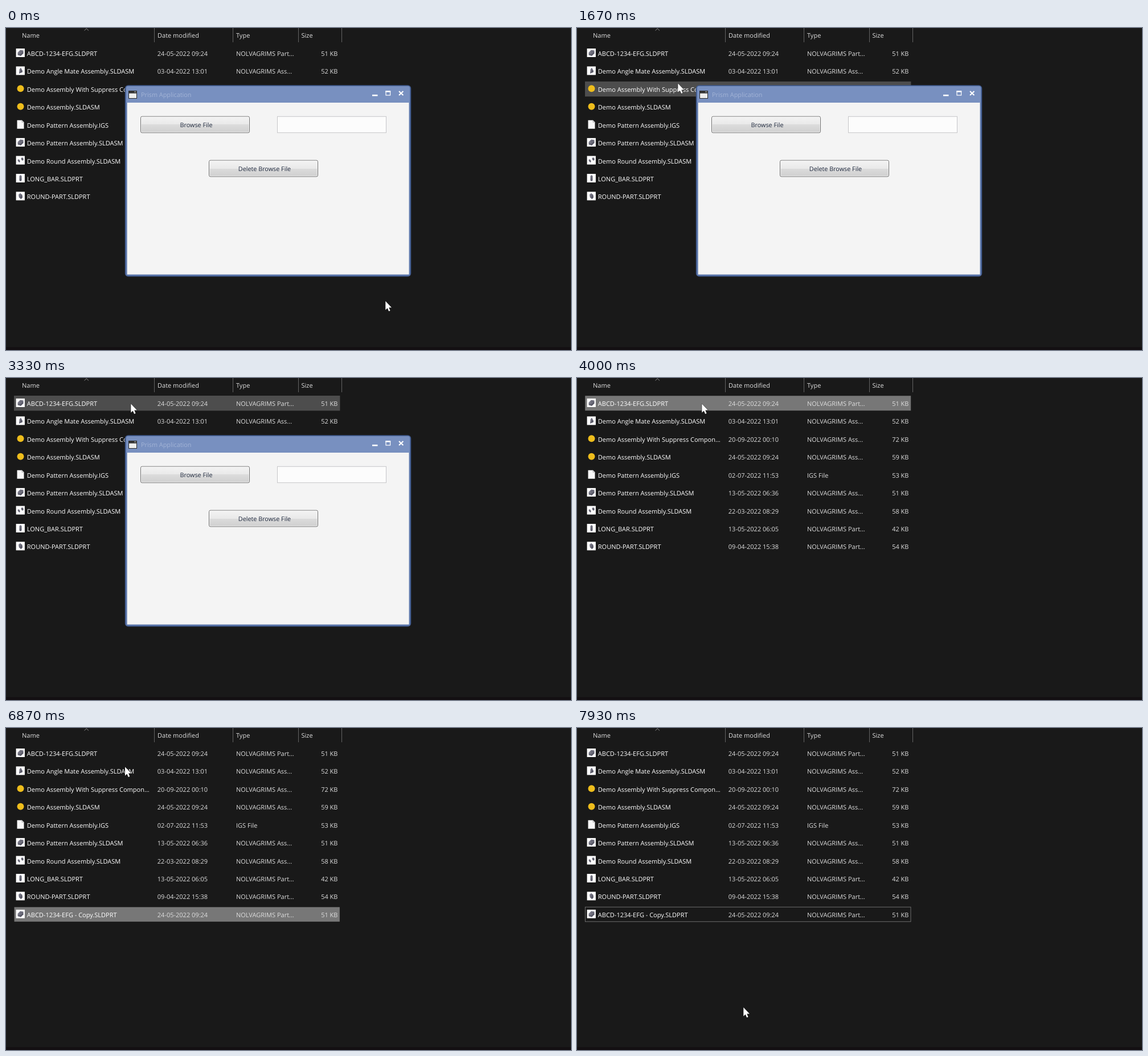
An HTML page that plays this animation: 992 px wide and 565 px high, repeating every 8000 ms.

```html
<!DOCTYPE html>
<html lang="en">
<head>
<meta charset="utf-8">
<title>File list</title>
<style>
  html, body { margin: 0; width: 100%; height: 100%; overflow: hidden; background: #191919; }
  svg { display: block; width: 100%; height: 100%; }
  text { font-family: "Open Sans", "Noto Sans", sans-serif; font-size: 11px; fill: #dedede; text-rendering: geometricPrecision; }
  .name { fill: #fff; }
  .end { text-anchor: end; }
  .ui { font-size: 10.8px; fill: #222c40; text-anchor: middle; }
  .title { font-size: 10.86px; fill: #a3b4d6; }
</style>
</head>
<body>
<svg id="stage" viewBox="0 0 992 565">
  <defs>
    <linearGradient id="face" x2="0" y2="1">
      <stop offset="0" stop-color="#f3f3f3"/>
      <stop offset=".5" stop-color="#e9e9e9"/>
      <stop offset=".5" stop-color="#dcdcdc"/>
      <stop offset="1" stop-color="#cfcfcf"/>
    </linearGradient>
    <linearGradient id="metal" x2="1" y2="1">
      <stop offset="0" stop-color="#8d8d9b"/>
      <stop offset="1" stop-color="#3f3f4d"/>
    </linearGradient>
  </defs>
  <rect width="992" height="565" fill="#191919"/>
  <rect y="560" width="992" height="5" fill="#130f12"/>
  <g id="header">
    <path d="M260.5 0V25M398.5 0V25M513.5 0V25M589.5 0V25" stroke="#636363"/>
    <path d="M137.5 4.5L141.3 1L145 4.5" fill="none" stroke="#8a8a8a"/>
  </g>
  <rect id="hover" x="14" y="31" width="572.4" height="26.4" fill="#4d4d4d"/>
  <rect id="select" x="14.5" y="31.5" width="571.4" height="25.5" fill="#777"/>
  <rect id="focus" x="14.4" y="31.4" width="571.6" height="25.6" fill="none" stroke="#777" stroke-width=".9"/>
  <g id="rows"></g>
  <g id="dialog">
    <rect x="209.5" y="101" width="501" height="334.5" rx="5" fill="#4f6ca3" stroke="#40598c" stroke-width="1.4"/>
    <path d="M211 131V105Q211 102 214 102H706Q709 102 709 105V131Z" fill="#7890c0"/>
    <path d="M211.3 131V433.7H708.7V131" fill="none" stroke="#7088b8" stroke-width=".8"/>
    <rect x="212.6" y="131" width="495" height="301.5" fill="#f4f4f4"/>
    <rect x="215.5" y="110.5" width="14" height="13" fill="#eee" stroke="#2b2b2b"/>
    <path d="M216 112.7H229" stroke="#333" stroke-width="4"/>
    <path d="M225 112H228.5" stroke="#ccc" stroke-width="1"/>
    <text x="237" y="121" class="title">Prism Application</text>
    <g fill="none" stroke="#fff">
      <path d="M643 118.2H652.5" stroke-width="2.6"/>
      <rect x="667" y="111" width="7.6" height="7" stroke-width="1.2"/>
      <path d="M666.4 111.4H675.2" stroke-width="2.4"/>
      <path d="M690 111L697.4 118M697.4 111L690 118" stroke-width="2.1"/>
    </g>
    <rect x="476.5" y="155.3" width="191" height="28.4" fill="#fcfcfc" stroke="#c6c6c9"/>
  </g>
  <path id="cursor" d="M.3 .3V15.8L3.7 12.6L6.1 18L8.6 16.9L6.3 11.6H11Z" fill="#fff" stroke="#111" stroke-width="1" paint-order="stroke"/>
</svg>
<script>
const $ = id => document.getElementById(id);
const add = (id, markup) => $(id).insertAdjacentHTML('beforeend', markup);
const label = (x, y, str, cls = '') => `<text x="${x}" y="${y}" class="${cls}">${str}</text>`;
const pitch = 31.42;
const shift = row => `translate(0 ${row * pitch})`;

const thumb = d =>
  `<rect x="17.6" y="36" width="15.3" height="15" fill="#fff"/><path d="${d}" fill="url(#metal)"/>`;
const icons = {
  block: thumb('M20.5 43L25 38.5L30.5 39.5V44.5L26 49L20.5 47.5Z') +
    '<path d="M20.8 43.2L26 44.3L30.3 39.7" fill="none" stroke="#9c9caa" stroke-width=".5"/>',
  wedge: thumb('M23 48.5L23.6 41L26 38L28.8 43.5V46Z'),
  assembly: '<circle cx="25.5" cy="43.5" r="6" fill="#eebd1c"/>',
  page: '<path d="M19.5 36H28L31.5 39.5V51H19.5Z" fill="#f8f8f8"/><path d="M28 36V39.5H31.5" fill="none" stroke="#999" stroke-width=".8"/>',
  pair: thumb('M20.5 44Q20 41.5 22.5 42Q25 43.5 24.5 46.5Q23 48.5 20.5 44ZM26.5 40Q28 37.5 30 39.5Q31.5 42.5 29.5 44Q26.5 44 26.5 40Z'),
  bar: thumb('M23.4 39.5L25.5 38L27.4 39.5V47.5L25.5 49L23.4 47.5Z'),
  round: thumb('M22 41L25 38.5L28.5 41.5L29 46L26.5 48.8L22.8 46Z')
};

const part = 'NOLVAGRIMS Part...', assembly = 'NOLVAGRIMS Ass...';
const files = [
  ['block', 'ABCD-1234-EFG.SLDPRT', '24-05-2022 09:24', part, 51],
  ['wedge', 'Demo Angle Mate Assembly.SLDASM', '03-04-2022 13:01', assembly, 52],
  ['assembly', 'Demo Assembly With Suppress Compon...', '20-09-2022 00:10', assembly, 72],
  ['assembly', 'Demo Assembly.SLDASM', '24-05-2022 09:24', assembly, 59],
  ['page', 'Demo Pattern Assembly.IGS', '02-07-2022 11:53', 'IGS File', 53],
  ['block', 'Demo Pattern Assembly.SLDASM', '13-05-2022 06:36', assembly, 51],
  ['pair', 'Demo Round Assembly.SLDASM', '22-03-2022 08:29', assembly, 58],
  ['bar', 'LONG_BAR.SLDPRT', '13-05-2022 06:05', part, 42],
  ['round', 'ROUND-PART.SLDPRT', '09-04-2022 15:38', part, 54],
  ['block', 'ABCD-1234-EFG - Copy.SLDPRT', '24-05-2022 09:24', part, 51]
];

[[28, 'Name'], [266, 'Date modified'], [404, 'Type'], [518.5, 'Size']]
  .forEach(([x, str]) => add('header', label(x, 17, str)));

files.forEach(([icon, name, date, type, size], i) => add('rows',
  `<g transform="${shift(i)}">${icons[icon]}` +
  label(36.8, 49, name, 'name') + label(265.8, 49, date) +
  label(404, 49, type) + label(582.5, 49, size + ' KB', 'end') + '</g>'));
const copyRow = $('rows').lastElementChild;

const button = (x, y, str) => add('dialog',
  `<rect x="${x}" y="${y}" width="191" height="28.6" rx="2.5" fill="url(#face)" stroke="#707070"/>` +
  `<rect x="${x + 1}" y="${y + 1}" width="189" height="26.6" rx="1.5" fill="none" stroke="#fff" stroke-opacity=".6"/>` +
  label(x + 97.5, y + 19, str, 'ui'));
button(236.5, 155.2, 'Browse File');
button(356.5, 232.2, 'Delete Browse File');

// Pointer path: [tick, x, y], 15 ticks per second
const path = [
  [3, 666, 479], [16, 185, 145], [25, 177, 97], [29, 172, 81], [39, 159, 45],
  [47, 159, 45], [50, 219, 45], [102, 219, 45], [103, 208.7, 68],
  [107, 300, 497], [112, 300, 497], [119, 292, 490]
];

function pointer(tick) {
  const n = path.findIndex(p => p[0] >= tick);
  if (n <= 0) return path[n ? path.length - 1 : 0].slice(1);
  const [t0, x0, y0] = path[n - 1], [t1, x1, y1] = path[n];
  let u = (tick - t0) / (t1 - t0);
  if (n === 1) u = u * u * (3 - 2 * u);
  return [x0 + (x1 - x0) * u, y0 + (y1 - y0) * u];
}

const show = (el, on) => el.setAttribute('visibility', on ? 'visible' : 'hidden');
const move = (id, transform) => $(id).setAttribute('transform', transform);

function draw(now) {
  const tick = Math.floor((now % 8000 + 3.4) * 15 / 1000) % 120;
  const [x, y] = pointer(tick);
  const open = tick < 60, copied = tick >= 93, cleared = tick >= 114;
  const row = Math.floor((y - 28.5) / pitch);
  const overDialog = open && x >= 209 && x < 711 && y >= 100 && y < 436;
  const hovering = tick < 103 && x >= 14 && x < 587 && row >= 0 && row < 9 && !overDialog;

  move('cursor', `translate(${x} ${y})`);
  move('hover', shift(row));
  move('select', shift(copied ? 9 : 0));
  move('focus', shift(9));
  show($('hover'), hovering);
  show($('select'), !open && !cleared);
  show($('focus'), cleared);
  show($('dialog'), open);
  show(copyRow, copied);
}

const start = performance.now();
(function loop() {
  draw(performance.now() - start);
  requestAnimationFrame(loop);
})();
</script>
</body>
</html>
```
